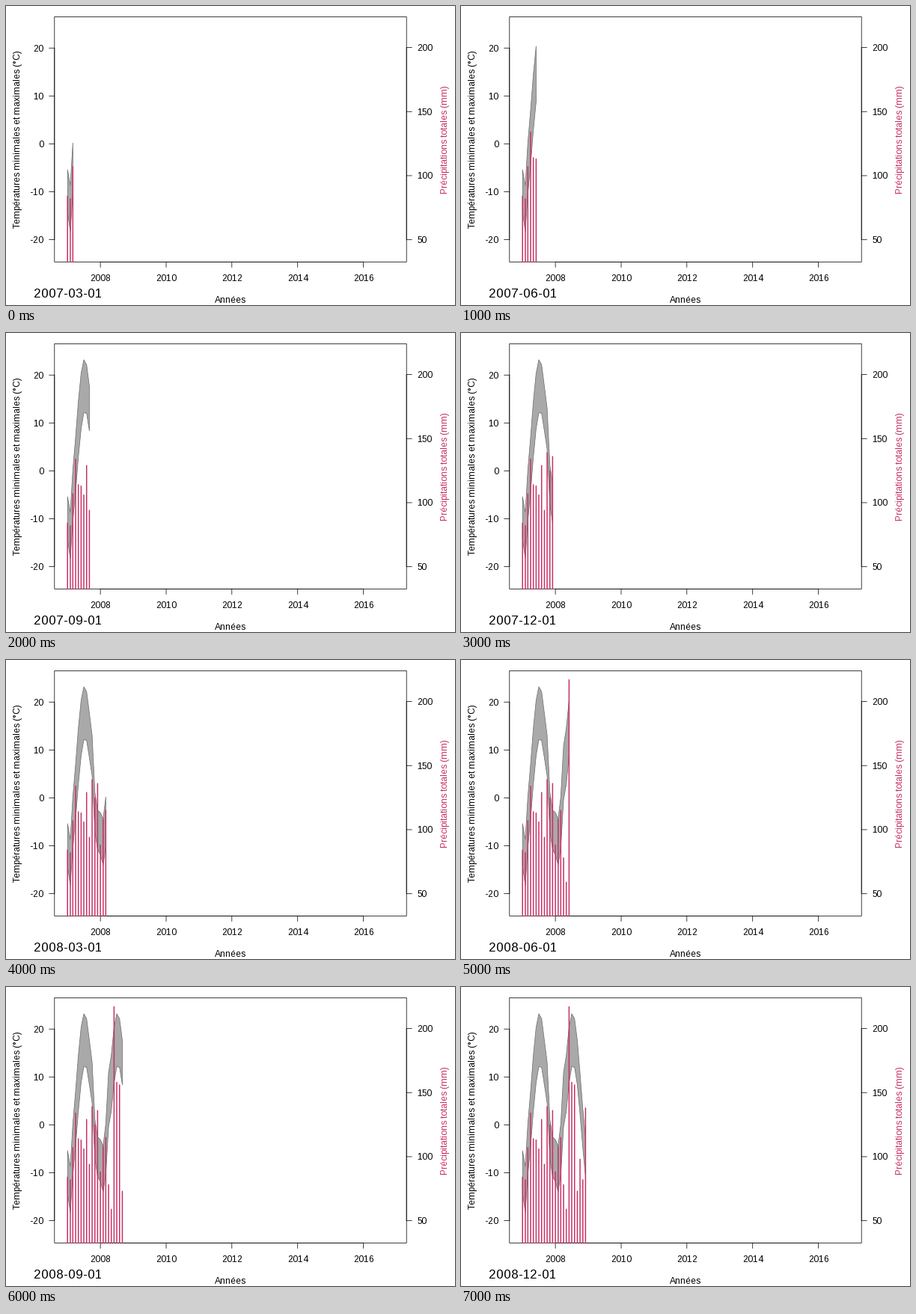
Recreate the animation shown at these times as a matplotlib script. Size 600 px wide and 400 px high, loop 8 s.

```python
import numpy as np
import matplotlib.pyplot as plt
from matplotlib.animation import FuncAnimation
from matplotlib.collections import LineCollection

plt.rcParams["font.family"] = "Liberation Sans"
plt.rcParams["text.hinting_factor"] = 1  # whole-pixel letter advances

W, H = 600, 400
LEFT, RIGHT, TOP, BOTTOM = 64.8, 535.2, 14.4, 342.4
MID_X, MID_Y = (LEFT + RIGHT) / 2, (TOP + BOTTOM) / 2
LINE = 14.4  # height of one margin line
TICK = LINE / 2
RED = "#C62F65"

# Monthly precipitation (mm)
RAIN = [84, 82, 107, 134, 114, 113, 106, 129, 94, 139, 125, 136,
        88, 108, 115, 78, 59, 217, 158, 156, 73, 98, 82, 138]
# Months that stray from the seasonal curve (°C)
ANOMALY = {1: -4.3, 9: 2.4, 10: -2.2, 12: 2.3, 15: 3.8}


def date_x(date):
    days = (np.asarray(date, "datetime64[D]") - np.datetime64("2007-01-01")).astype(int)
    return 82.22 + days * 435.56 / 3622


def temp_y(t):
    return 184.4 - 6.408 * t


def rain_y(mm):
    return 398.4 - 1.7143 * mm


def season(shift):
    return 2 * np.pi * (np.arange(len(RAIN)) - shift) / 12


months = np.datetime64("2007-01") + np.arange(len(RAIN))
month_x = date_x(months)
high = 8.9 - 14.4 * np.cos(season(0.24))
for m, change in ANOMALY.items():
    high[m] += change
low = high - 9.9 - 1.8 * np.sin(season(1.3))

fig = plt.figure(figsize=(W / 72, H / 72), dpi=72, facecolor="white")
ax = fig.add_axes([0, 0, 1, 1])
ax.set_xlim(0, W)
ax.set_ylim(H, 0)
ax.axis("off")


def line(xs, ys):
    ax.plot(xs, ys, color="black", lw=0.75, snap=False, zorder=3,
            solid_capstyle="round")


def label(x, y, s, **kw):
    kw = {"size": 12, "ha": "center", "va": "baseline", **kw}
    return ax.text(x, y, s, rotation_mode="anchor", **kw)


ax.add_patch(plt.Rectangle((LEFT, TOP), RIGHT - LEFT, BOTTOM - TOP, fill=False,
                           lw=0.75, joinstyle="round", snap=False, zorder=3))


def side_axis(x, out, values, to_y, ha):
    line([x, x], [to_y(values[0]), to_y(values[-1])])
    for v in values:
        y = to_y(v)
        line([x, x + out * TICK], [y, y])
        label(x + out * LINE, y + 4.3, str(v), ha=ha)


side_axis(LEFT, -1, range(-20, 21, 10), temp_y, "right")
side_axis(RIGHT, 1, range(50, 201, 50), rain_y, "left")

years = range(2008, 2017, 2)
year_x = [date_x(f"{year}-01-01") for year in years]
line([year_x[0], year_x[-1]], [BOTTOM, BOTTOM])
for x, year in zip(year_x, years):
    line([x, x], [BOTTOM, BOTTOM + TICK])
    label(x, BOTTOM + 1.8 * LINE, str(year))

label(MID_X, BOTTOM + 3.8 * LINE, "Années")
label(LEFT - 3.2 * LINE, MID_Y, "Températures minimales et maximales (°C)",
      rotation=90)
label(RIGHT + 3.8 * LINE, MID_Y, "Précipitations totales (mm)",
      rotation=90, color=RED)

band = plt.Polygon([[0, 0]], closed=True, fc="#A9A9A9", ec="#6E6E6E",
                   lw=0.75, joinstyle="round", snap=False, zorder=2)
ax.add_patch(band)
bars = LineCollection([], colors=RED, linewidths=1.5, capstyle="round",
                      snap=False, zorder=4)
ax.add_collection(bars, autolim=False)
date = label(month_x[0], BOTTOM + 3.3 * LINE, "", size=16.8)


def update(i):
    n = 3 * (i + 1)
    xs = month_x[:n]
    upper = list(zip(xs, temp_y(high)))
    lower = list(zip(xs, temp_y(low)))
    band.set_xy(upper + lower[::-1])
    bars.set_segments([[(x, BOTTOM), (x, rain_y(mm))] for x, mm in zip(xs, RAIN)])
    date.set_text(f"{months[n - 1]}-01")
    return band, bars, date


anim = FuncAnimation(fig, update, frames=8, interval=1000,
                     repeat=True, repeat_delay=0)
plt.show()
```
